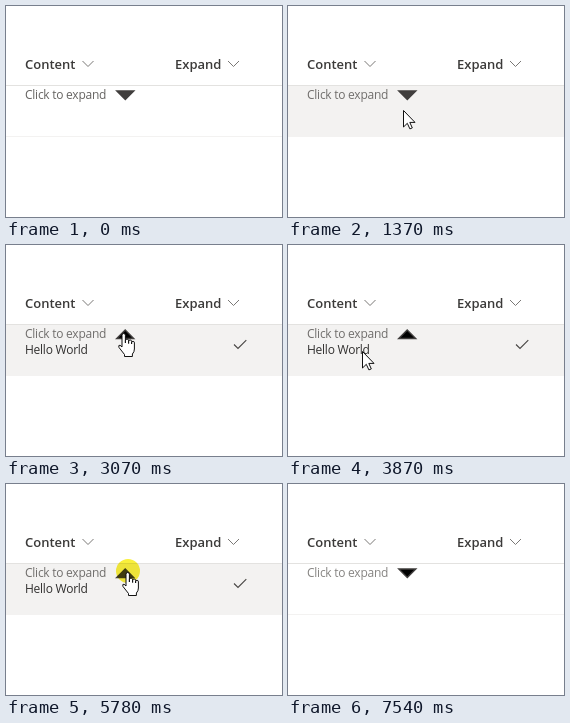
An HTML page for the animation above (8280 ms loop, 276 by 211 pixels).

```html
<!DOCTYPE html>
<html lang="en">
<head>
<meta charset="utf-8">
<title>Click to expand</title>
<style>
  html, body { margin: 0; width: 100%; height: 100%; overflow: hidden; background: #fff; }
  svg { display: block; font: 12px "Open Sans", "Noto Sans", sans-serif; letter-spacing: -.25px; }
  .head { font-size: 13px; font-weight: 600; letter-spacing: 0; fill: #3b3a39; }
  .line { fill: none; stroke: #7a7876; }
  .cursor { fill: #fff; stroke: #111; stroke-linejoin: round; }
  #arrow { stroke: #403e3d; stroke-width: 1.4; }
  #spot { fill: #f9f03c; mix-blend-mode: multiply; }
</style>
</head>
<body>
<svg width="276" height="211" viewBox="0 0 276 211">
  <rect id="row" y="80" width="276" height="51" fill="#f3f2f1"/>
  <path d="M0 79.5H276" stroke="#e3e2e0"/>
  <path id="rule" d="M0 130.5H276" stroke="#f3f2f1"/>
  <g class="head">
    <text x="19" y="63">Content</text>
    <text x="169" y="63">Expand</text>
  </g>
  <path class="line" d="M76.5 55l5.5 5.5 5.5-5.5M222 55l5.5 5.5 5.5-5.5"/>
  <text id="label" x="19" y="93">Click to expand</text>
  <path id="arrow"/>
  <g id="details">
    <text x="19" y="109" fill="#323130">Hello World</text>
    <path d="M228 99.5l4 4 8.3-8.3" fill="none" stroke="#484644" stroke-width="1.1"/>
  </g>
  <circle id="spot" r="12"/>
  <g id="pointer" class="cursor">
    <path id="plain" d="M.5.5V17l3.8-3.7 2.6 5.6 2.4-1-2.5-5.5H12z"/>
    <path id="hand" transform="translate(-1 1)" d="M-1 14V2.2a1.7 1.7 0 0 1 3.4 0V10V7.6a1.5 1.5 0 0 1 3.2.2V10.5V8.4a1.5 1.5 0 0 1 3 .2V11V9.6a1.4 1.4 0 0 1 2.8.3V16q0 3-2 5v2.5H1.5v-2L-4 14.5q-1-2.5 1-2.3z"/>
  </g>
</svg>
<script>
const LOOP = 8280, STEP = 70, ENTER = 730, LEAVE = 7540;

// Each move ends at (x, y); the powers bend its path, above 1 means fast first.
const moves = [
  { start: ENTER, end: 1510, x: 114, y: 101, px: 3, py: 2 },
  { start: 1580, end: 1790, x: 114, y: 84 },
  { start: 1990, end: 2060, x: 118, y: 87 },
  { start: 3660, end: 4010, x: 26, y: 107, px: .6, py: 3 },
  { start: 4160, end: 4910, x: 125, y: 96, py: .2 },
  { start: 5040, end: 5180, x: 123, y: 87 },
  { start: 5380, end: 5380, x: 122, y: 87 },
  { start: 6660, end: 6870, x: 122, y: 100 },
  { start: 7400, end: LEAVE, x: 285, y: 210 }
];

const between = (t, a, b) => t >= a && t < b;
const show = (id, on) => $(id).setAttribute("visibility", on ? "visible" : "hidden");
const $ = id => document.getElementById(id);

function position(t) {
  let px0 = 312, py0 = 220;
  for (const { start, end, x, y, px = 1, py = 1 } of moves) {
    if (t < start) break;
    const steps = Math.floor((end - start) / STEP) + 1;
    const left = Math.max(0, 1 - (Math.floor((t - start) / STEP) + 1) / steps);
    px0 = x + (px0 - x) * left ** px;
    py0 = y + (py0 - y) * left ** py;
  }
  return [Math.round(px0), Math.round(py0)];
}

function draw(t) {
  const [x, y] = position(t);
  const inside = between(t, ENTER, LEAVE);
  const hover = inside && y < 131;
  const over = inside && between(x, 109, 131) && y < 96;
  const open = between(t, 3070, 6110);
  const click = between(t, 2670, 2800) || between(t, 5780, 5910);

  show("row", hover);
  show("rule", !hover);
  show("details", open);
  show("spot", click);
  show("plain", inside && !over);
  show("hand", over);
  $("label").setAttribute("fill", hover ? "#706e6c" : t < LEAVE - STEP ? "#666462" : "#868482");
  $("arrow").setAttribute("d", open ? "M110.7 93.5h17l-8.5-8.6z" : "M110.8 85h17l-8.5 8.4z");
  $("arrow").setAttribute("fill", t < 1720 || click ? "#403e3d" : "#000");
  for (const id of ["pointer", "spot"]) $(id).setAttribute("transform", `translate(${x} ${y})`);
}

const begin = performance.now();
function frame() {
  draw((performance.now() - begin) % LOOP);
  requestAnimationFrame(frame);
}
frame();
</script>
</body>
</html>
```
